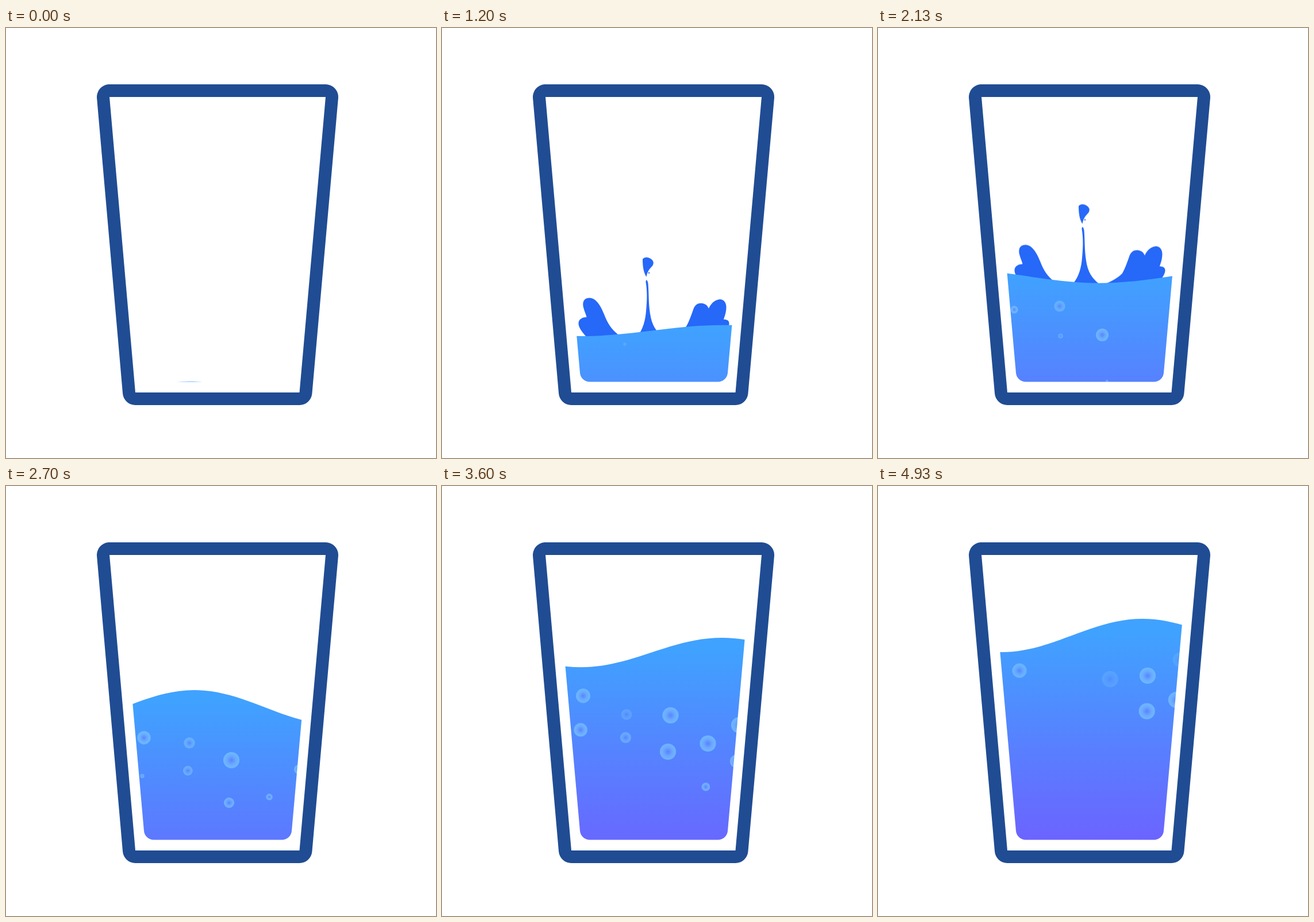
An HTML page without scripts for the animation above (5010 ms loop, 748 by 748 pixels).

```html
<!DOCTYPE html>
<html lang="en">
<head>
<meta charset="utf-8">
<title>Filling glass</title>
<style>
  html, body { margin: 0; width: 100%; height: 100%; overflow: hidden; background: #fff; }
  svg { display: block; width: 100vw; height: 100vh; }

  .wave, .level, .splash, .bubble { animation: 5010ms linear infinite both; }
  .wave { animation-name: wave; }
  .level { animation-name: level; }
  .splash { animation-name: splash; fill: #2668f8; }
  .bubble { fill: url(#bubble); }
  .late { animation-delay: 730ms; }
  .a { animation-name: rise-a; }
  .b { animation-name: rise-b; }
  .c { animation-name: rise-c; }
  .d { animation-name: rise-d; }
  .e { animation-name: rise-e; }

  /* crest position, mean level, amplitude */
  @keyframes wave {
    0% { transform: translate(1300px, 644.7px) scaleY(30); }
    10.58% { transform: translate(890px, 597px) scaleY(20); }
    21.96% { transform: translate(550px, 541px) scaleY(14); }
    23.95% { transform: translate(490px, 526.5px) scaleY(9.5); }
    32.53% { transform: translate(290px, 478px) scaleY(20); }
    42.51% { transform: translate(140px, 432.3px) scaleY(11.5); }
    53.89% { transform: translate(-162px, 385px) scaleY(30); }
    71.86% { transform: translate(-493px, 289.7px) scaleY(25.6); }
    77.84%, 100% { transform: translate(-520px, 260px) scaleY(29); }
  }
  @keyframes level {
    0% { transform: translateY(644.7px); }
    77.84%, 100% { transform: translateY(260px); }
  }
  @keyframes splash {
    0%, 14% { transform: translateY(330px); animation-timing-function: ease-out; }
    20.96% { transform: translateY(88px); }
    23.95% { transform: translateY(92px); }
    32.53% { transform: translateY(68px); }
    42.51% { transform: translateY(0); }
    44.51% { transform: translateY(-29px); animation-timing-function: ease-in; }
    50.9% { transform: translateY(110px); }
    60%, 100% { transform: translateY(330px); }
  }
  @keyframes rise-a {
    0%, 20.96% { transform: translate(318px, 560px) scale(0); opacity: .6; }
    23.95% { transform: translate(318px, 550px) scale(.18); }
    42.51% { transform: translate(316px, 484px) scale(.68); }
    53.89% { transform: translate(319px, 447px) scale(.68); opacity: .65; }
    71.86% { transform: translate(321px, 397.5px) scale(.66); opacity: .4; }
    78.8%, 100% { transform: translate(321px, 378px) scale(.66); opacity: 0; }
  }
  @keyframes rise-b {
    0%, 27% { transform: translate(398px, 620px) scale(0); opacity: .75; }
    27.94% { transform: translate(398px, 615px) scale(.17); }
    39.32% { transform: translate(388px, 551px) scale(.64); }
    42.51% { transform: translate(390px, 534px) scale(.78); }
    53.89% { transform: translate(392px, 477px) scale(1); }
    71.86% { transform: translate(397.5px, 399px) scale(1); opacity: .75; }
    84.43% { transform: translate(404px, 333px) scale(1); opacity: .28; }
    89.8%, 100% { transform: translate(405px, 306px) scale(1); opacity: 0; }
  }
  @keyframes rise-c {
    0%, 35.93% { transform: translate(237px, 520px) scale(0); opacity: .85; }
    42.51% { transform: translate(237px, 490px) scale(.46); }
    53.89% { transform: translate(240px, 438px) scale(.82); }
    71.86% { transform: translate(245.5px, 365px) scale(.89); }
    84.43% { transform: translate(246px, 319px) scale(.89); opacity: .7; }
    91.8%, 100% { transform: translate(247px, 290px) scale(.89); opacity: 0; }
  }
  @keyframes rise-d {
    0%, 48.9% { transform: translate(457px, 567px) scale(0); opacity: .8; }
    53.89% { transform: translate(458px, 541px) scale(.4); }
    71.86% { transform: translate(462.5px, 448px) scale(1); }
    84.43% { transform: translate(468px, 389px) scale(1); }
    98.4% { transform: translate(469px, 330px) scale(1); }
    100% { transform: translate(469px, 323px) scale(1); opacity: .75; }
  }
  @keyframes rise-e {
    0%, 45.9% { transform: translate(505px, 527px) scale(0); opacity: .8; }
    53.89% { transform: translate(509px, 493px) scale(.57); }
    57.3% { transform: translate(513px, 479px) scale(.86); }
    71.86% { transform: translate(517px, 416px) scale(1); }
    84.43% { transform: translate(519px, 370px) scale(1); opacity: .75; }
    98.4%, 100% { transform: translate(525px, 302px) scale(.88); opacity: .28; }
  }
</style>
</head>
<body>
<svg viewBox="0 0 748 748">
  <defs>
    <linearGradient id="water" gradientUnits="userSpaceOnUse" x1="0" y1="-5" x2="0" y2="360">
      <stop offset="0" stop-color="#40a2ff"/>
      <stop offset="1" stop-color="#6c63ff"/>
    </linearGradient>
    <radialGradient id="bubble">
      <stop offset="0" stop-color="#5f80ff"/>
      <stop offset=".55" stop-color="#73b4ff"/>
      <stop offset="1" stop-color="#7cc6ff"/>
    </radialGradient>
    <clipPath id="cup">
      <path d="M200 150L240 600A17 17 0 0 0 257 615.5H480A17 17 0 0 0 497 600L537 150Z"/>
    </clipPath>
    <clipPath id="surface">
      <path class="wave" d="M-1225 1c89 0 156-2 245-2s156 2 245 2s156-2 245-2s156 2 245 2s156-2 245-2s156 2 245 2s156-2 245-2s156 2 245 2s156-2 245-2s156 2 245 2V60H-1225Z"/>
    </clipPath>
  </defs>

  <path d="M180 120H556L510.500 634H225Z" fill="#fff" stroke="#204c93" stroke-width="44" stroke-linejoin="round" paint-order="stroke"/>

  <g clip-path="url(#cup)">
    <g class="splash">
      <path d="M306 441C295 432 288 422 282 406C276 391 268 378 257 377.500C246 377 244 386 246 394C248 402 251 407 251.500 411C245 411 238 414 237.500 421C237 428 243 436 250 444V520H330V460Z"/>
      <path d="M340 444C350 432 354 415 355 400C357 380 357 365 354.500 350C354.500 345 357 345 358.500 352C360 370 359 385 362 405C365 425 372 435 384 445V520H330V455Z"/>
      <path d="M349 310C352 306 359 306 364 310C369 314 369 319 364 324C359 329 357 334 355.500 341C351 333 349 325 349 310Z"/>
      <circle cx="360" cy="334" r="1.200"/>
      <path d="M392 447C408 440 419 434 425 427C430 418 433 409 437 398C440 388 447 386 453 387C459 388 462 391 464 396C467 389 473 381 483 380C493 380 496 390 494 400C493 407 491 411 490 415C496 415 499 417 499.500 421C500 426 497 430 494 436V520H380V455Z"/>
    </g>
    <g clip-path="url(#surface)">
      <rect class="level" x="190" y="-60" width="360" height="460" fill="url(#water)"/>
      <circle class="bubble a" r="14"/>
      <circle class="bubble a late" r="14"/>
      <circle class="bubble b" r="14"/>
      <circle class="bubble b late" r="14"/>
      <circle class="bubble c" r="14"/>
      <circle class="bubble c late" r="14"/>
      <circle class="bubble d" r="14"/>
      <circle class="bubble d late" r="14"/>
      <circle class="bubble e" r="14"/>
      <circle class="bubble e late" r="14"/>
    </g>
  </g>
</svg>
</body>
</html>
```
